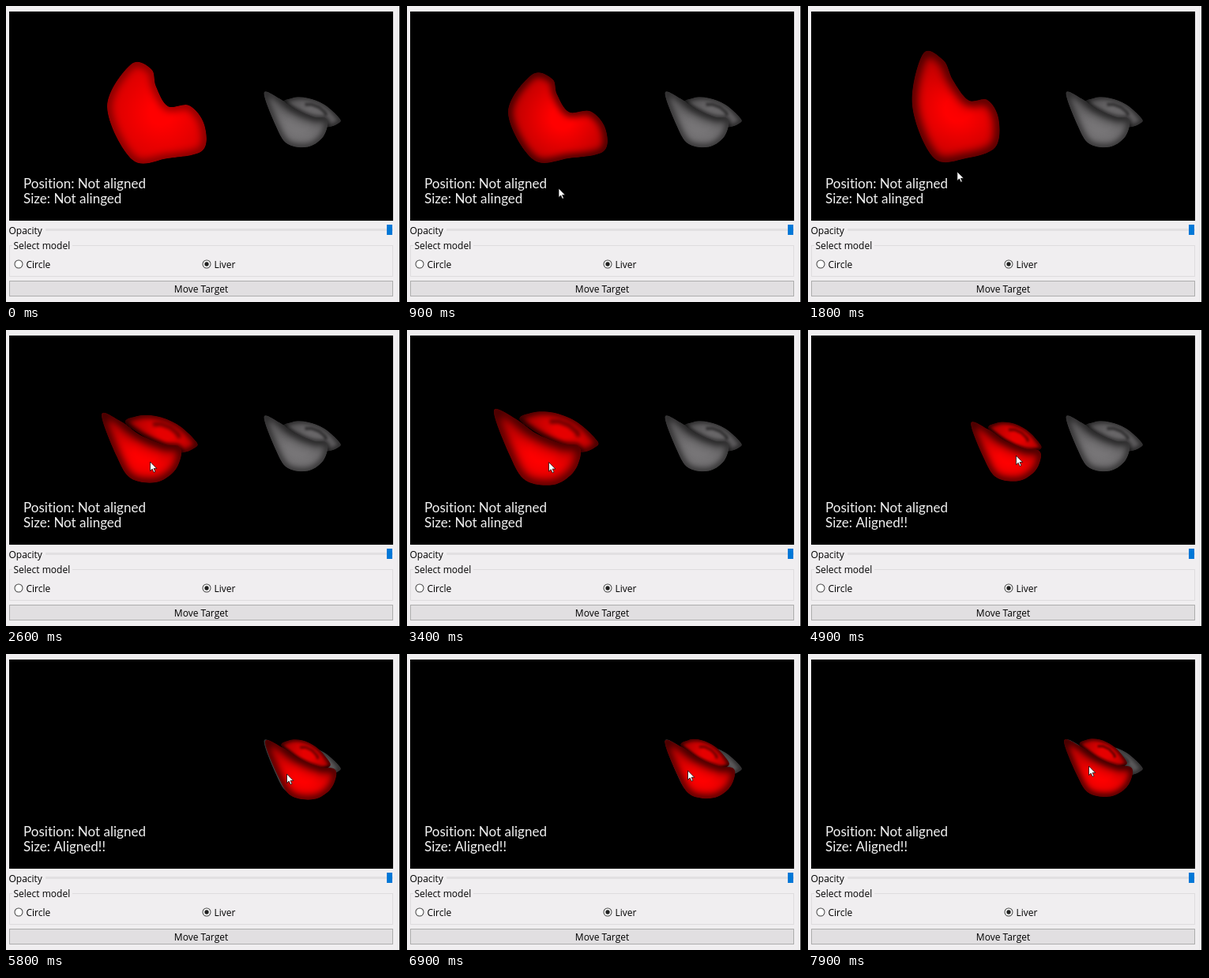
An HTML page with a canvas that plays this animation: 500 by 375 pixels, repeating every 8 s.

```html
<!DOCTYPE html>
<html lang="en">
<head>
<meta charset="utf-8">
<title>Liver alignment</title>
<style>
html, body { margin: 0; width: 100%; height: 100%; overflow: hidden; background: #f0eef0; }
canvas { display: block; }
</style>
</head>
<body>
<canvas id="stage" width="500" height="375"></canvas>
<script>
const ctx = document.getElementById('stage').getContext('2d');
const LOOP = 8000, STEP = 100;
const UI_FONT = '12px "Open Sans", sans-serif';
const VIEW_FONT = '17px Lato, sans-serif';

const mix = (a, b, u) => a + (b - a) * u;
const mixPoint = (p, q, u) => [mix(p[0], q[0], u), mix(p[1], q[1], u)];
const span = (t, from, to) => Math.min(1, Math.max(0, (t - from) / (to - from)));
const ease = (t, from, to) => {
  const u = span(t, from, to);
  return u * u * (3 - 2 * u);
};
const swell = u => Math.sin(Math.PI * u);

// Outlines run clockwise from the upper left tip.
const UPRIGHT = [[158, 74], [184, 80], [190, 102], [205, 127], [232, 126],
  [251, 150], [249, 183], [205, 193], [160, 195], [128, 128]];
const TILTED = [[121, 107], [146, 116], [170, 133], [199, 145], [218, 147],
  [222, 158], [213, 179], [190, 193], [158, 188], [140, 160]];
const BACK = [[153, 120], [166, 109], [190, 109], [216, 119], [237, 137], [241, 148], [212, 154]];
const TIP = TILTED[0], BASE = 193;

// The back lobe unfolds from inside the front one as the organ turns.
function liver({ x, y, scale, turn = 1, stretch = 1, yaw = 0, drop = -4 * yaw, shade }) {
  const place = (p, widen, shift) => {
    const py = BASE + (p[1] - BASE) * stretch + shift;
    return [x + (p[0] - TIP[0]) * scale * widen, y + (py - TIP[1]) * scale];
  };
  const front = TILTED.map((p, i) => place(mixPoint(UPRIGHT[i], p, turn), 1 + .05 * yaw, 0));
  const back = BACK.map(p => place(mixPoint([190, 160], p, turn), 1 - .2 * yaw, drop));
  return { front, back, turn, shade };
}

// Phases of the user's gestures, each running from 0 to 1.
function phases(t) {
  return {
    lean: ease(t, 500, 900),
    turn: ease(t, 1300, 2600),
    zoom: span(t, 3200, 3800),
    shrink: ease(t, 3200, 3900),
    fit: ease(t, 4000, 4500),
    drag: ease(t, 4700, 5200),
    nudge: ease(t, 6100, 7900)
  };
}

function movingLiver({ lean, turn, zoom, shrink, fit, drag, nudge }) {
  const pulse = swell(zoom);
  return liver({
    x: TIP[0] + 5 * shrink - 14 * pulse + 14 * fit + 188 * drag - 4 * nudge,
    y: TIP[1] + 3 * shrink - 6 * pulse + 12 * fit - 11 * drag - nudge,
    scale: 1 - .07 * shrink + .12 * pulse - .08 * fit - .03 * nudge,
    stretch: 1 - .11 * lean * (1 - turn) + .35 * swell(turn),
    yaw: (fit + drag) / 2,
    turn,
    shade: mix(.4, .65, lean)
  });
}

function cursorPoint({ lean, turn, shrink, fit, drag, nudge }) {
  return [
    192 - 9.5 * turn - 15 * shrink + 46 * fit + 142 * drag,
    196 + 35 * lean - 64 * turn + 3 * shrink - 7 * fit - 11 * drag - 10 * nudge
  ];
}

function smooth(points) {
  const path = new Path2D(), n = points.length;
  path.moveTo(...points[0]);
  for (let i = 0; i < n; i++) {
    const [a, b, c, d] = [-1, 0, 1, 2].map(k => points[(i + k + n) % n]);
    path.bezierCurveTo(b[0] + (c[0] - a[0]) / 6, b[1] + (c[1] - a[1]) / 6,
      c[0] - (d[0] - b[0]) / 6, c[1] - (d[1] - b[1]) / 6, ...c);
  }
  path.closePath();
  return path;
}

function polyline(points) {
  const path = new Path2D();
  points.forEach(p => path.lineTo(...p));
  return path;
}

function softStroke(path, width, alpha) {
  ctx.filter = `blur(${width * .4}px)`;
  ctx.strokeStyle = `rgba(0,0,0,${alpha})`;
  ctx.lineWidth = width;
  ctx.stroke(path);
  ctx.filter = 'none';
}

const centre = points => [0, 1].map(k => points.reduce((s, p) => s + p[k], 0) / points.length);

function drawLobe(points, colour, shade, addFolds) {
  const path = smooth(points), middle = centre(points);
  const reach = Math.max(...points.map(p => Math.hypot(p[0] - middle[0], p[1] - middle[1])));
  ctx.save();
  ctx.clip(path);
  ctx.fillStyle = colour;
  ctx.fill(path);
  const falloff = ctx.createRadialGradient(...middle, reach * .2, ...middle, reach * 1.1);
  falloff.addColorStop(0, 'transparent');
  falloff.addColorStop(1, `rgba(0,0,0,${shade * .5})`);
  ctx.fillStyle = falloff;
  ctx.fill(path);
  softStroke(path, reach * .16, shade);
  addFolds(reach, middle);
  ctx.restore();
}

function drawLiver({ front, back, turn, shade }, frontColour, backColour) {
  drawLobe(back, backColour, shade, (reach, middle) => {
    const fold = back.slice(1, 6).map(p => mixPoint(middle, p, .45));
    softStroke(polyline(fold), reach * .1, .5);
    softStroke(smooth(front), reach * .12, .5);
  });
  drawLobe(front, frontColour, shade, reach =>
    softStroke(polyline(front.slice(1, 5)), reach * .3, .4 * turn));
}

function label(text, x, y, font = UI_FONT, colour = '#000', align = 'left') {
  ctx.font = font;
  ctx.fillStyle = colour;
  ctx.textAlign = align;
  ctx.fillText(text, x, y);
}

function box(x, y, w, h, fill, border) {
  ctx.fillStyle = fill;
  ctx.fillRect(x, y, w, h);
  if (!border) return;
  ctx.strokeStyle = border;
  ctx.lineWidth = 1;
  ctx.strokeRect(x + .5, y + .5, w - 1, h - 1);
}

function disc(x, y, r, fill) {
  ctx.beginPath();
  ctx.arc(x, y, r, 0, Math.PI * 2);
  ctx.fillStyle = fill;
  ctx.fill();
}

function radio(x, text, on) {
  disc(x, 327, 5.5, '#444');
  disc(x, 327, 4.5, '#fff');
  if (on) disc(x, 327, 2.7, '#222');
  label(text, x + 9.5, 332);
}

function drawPanel() {
  box(0, 0, 500, 375, '#f0eef0');
  box(498, 0, 2, 375, '#000');
  box(4, 7, 486, 265, '#000');
  label('Opacity', 3.5, 289);
  box(50, 282, 440, 3, '#e2e0e2');
  box(482, 277, 7, 13, '#0078d7');
  box(4, 303, 486, 40, '#f0eef0', '#dedcde');
  box(8, 298, 76, 12, '#f0eef0');
  label('Select model', 9.5, 308);
  radio(16, 'Circle', false);
  radio(254, 'Liver', true);
  box(4, 348, 486, 20, '#e1dfe1', '#adadad');
  label('Move Target', 247, 363, UI_FONT, '#000', 'center');
}

function drawStatus(aligned) {
  ctx.letterSpacing = '0.01px'; // keeps "ti" from joining
  label('Position: Not aligned', 22, 231, VIEW_FONT, '#f2f2f2');
  label(aligned ? 'Size: Aligned!!' : 'Size: Not alinged', 22, 250, VIEW_FONT, '#f2f2f2');
  ctx.letterSpacing = '0px';
}

function drawCursor([x, y]) {
  const arrow = new Path2D('M0 0V16L3.7 12.6L6.4 18.5L9 17.4L6.4 11.7H11.5Z');
  ctx.save();
  ctx.translate(x, y);
  ctx.scale(.72, .72);
  ctx.fillStyle = '#fff';
  ctx.fill(arrow);
  ctx.strokeStyle = '#000';
  ctx.lineWidth = 1;
  ctx.stroke(arrow);
  ctx.restore();
}

const goal = liver({ x: 326.5, y: 110, scale: .8, drop: 6, shade: .5 });

function draw(t) {
  const phase = phases(t);
  drawPanel();
  drawLiver(goal, '#787678', '#686668');
  drawLiver(movingLiver(phase), '#ff0000', '#e60000');
  drawStatus(t >= 4400);
  if (t >= 600) drawCursor(cursorPoint(phase));
}

const start = performance.now();
function tick() {
  const elapsed = (performance.now() - start) % LOOP;
  draw(Math.floor(elapsed / STEP) * STEP);
  requestAnimationFrame(tick);
}
tick();
</script>
</body>
</html>
```
